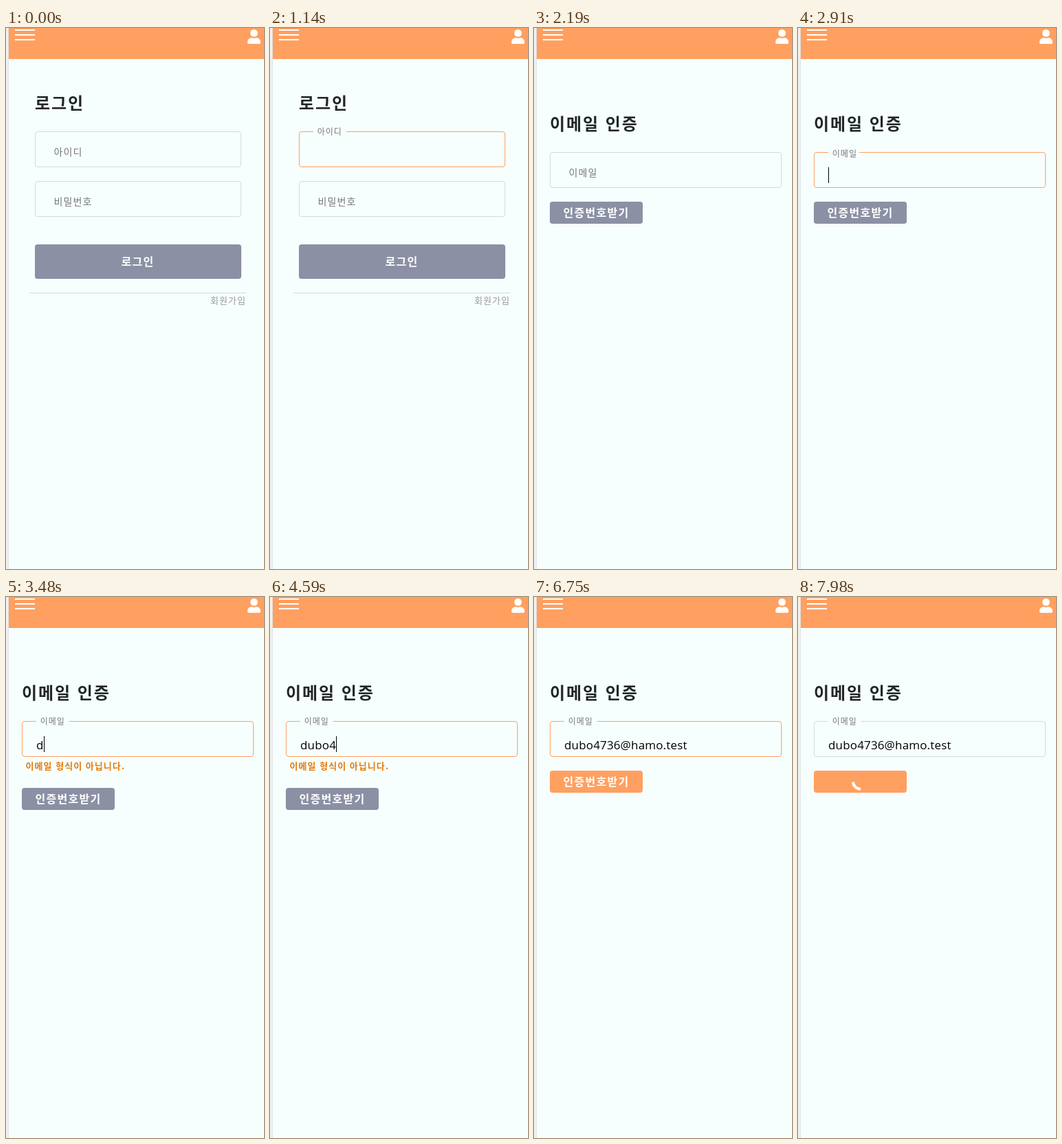
An HTML page that plays this animation: 375x785 px, repeating every 8000 ms.

```html
<!DOCTYPE html>
<html lang="ko">
<head>
<meta charset="utf-8">
<title>로그인</title>
<style>
  html, body { margin: 0; width: 100%; height: 100%; overflow: hidden; background: #f7fffe; }
  svg { display: block; width: 375px; height: 785px; }
  text { font-family: "Noto Sans CJK KR", "Noto Sans CJK", sans-serif; letter-spacing: .08em; white-space: pre; }
  .title { font-weight: 700; fill: #212529; }
  .label { font-weight: 500; fill: #777; }
  .error { font-weight: 700; fill: #e67a0c; }
  .latin { letter-spacing: .3px; }
  .button { font-weight: 700; fill: #fff; }
  .link { fill: #999; }
  .value { font: 17px "Open Sans", "Noto Sans", sans-serif; letter-spacing: .15px; fill: #000; }
</style>
</head>
<body>
<svg id="stage" viewBox="0 0 375 785">
  <rect width="375" height="785" fill="#f7fffe"/>
  <rect width="3" height="785" fill="#f0f0f1"/>
  <rect x="3" width="1" height="785" fill="#e0e3e3"/>
  <rect x="4" width="371" height="45" fill="#ffa060"/>
  <path d="M13 3H42M13 10H42M13 17H42" stroke="#fff" stroke-width="2"/>
  <g fill="#fff">
    <circle cx="360.5" cy="7.4" r="5.4"/>
    <path d="M351 21V20A5.7 5.7 0 0 1 356.7 14.2H357.4A7.5 7.5 0 0 0 363.6 14.2H364.3A5.7 5.7 0 0 1 370 20V21A2 2 0 0 1 368 23H353A2 2 0 0 1 351 21Z"/>
  </g>
</svg>
<script>
const ORANGE = '#ffa060', GREY = '#8c90a4', LINE = '#d3dad9', PAPER = '#f7fffe';
const LOOP = 8000, STEP = 30, ERROR_SHIFT = 25;
const EMAIL = 'dubo4736@hamo.test', TYPO = 'dubo3';

// Moments at which each character of the address appears; the fifth is first mistyped.
const KEYS = [3480, 3630, 3810, 3930, 4590, 4710, 4800, 4950, 5340,
              5460, 5550, 5700, 5790, 5880, 5970, 6090, 6180, 6270];

function add(parent, tag, attrs = {}, content = '') {
  const el = document.createElementNS('http://www.w3.org/2000/svg', tag);
  set(el, attrs);
  el.textContent = content;
  return parent.appendChild(el);
}
function set(el, attrs) {
  for (const name in attrs) el.setAttribute(name, attrs[name]);
}
function show(el, visible) { el.style.display = visible ? '' : 'none'; }
function shift(el, on) { set(el, { transform: `translate(0 ${on ? ERROR_SHIFT : 0})` }); }
function between(t, from, to) { return t >= from && t < to; }
function ease(t, start, duration) {
  const p = Math.min(1, Math.max(0, (t - start) / duration));
  return 1 - (1 - p) ** 2;
}
function mix(a, b, p) { return a + (b - a) * p; }

// Places text by its left edge and vertical middle.
function place(x, middle, size) {
  return { x, y: middle + size * .37, 'font-size': size };
}
function write(parent, cls, x, middle, size, content) {
  return add(parent, 'text', { class: cls, ...place(x, middle, size) }, content);
}
function button(parent, x, y, width, height, textX, content) {
  const g = add(parent, 'g');
  const box = add(g, 'rect', { x, y, width, height, rx: 4, fill: GREY });
  const text = write(g, 'button', textX, y + height / 2, 16, content);
  return { g, box, text };
}
function field(parent, x, y, width, name) {
  const g = add(parent, 'g');
  const border = add(g, 'rect', { x: x + .5, y: y + .5, width: width - 1, height: 51, rx: 3.5, fill: 'none', stroke: LINE });
  const notch = add(g, 'rect', { x: x + 21, y: y - 1, width: 0, height: 3, fill: PAPER });
  const label = write(g, 'label', x + 27.5, y + 29.5, 14, name);
  const value = add(g, 'text', { class: 'value', x: x + 21, y: y + 41 });
  const caret = add(g, 'rect', { y: y + 22, width: 1, height: 23 });
  show(caret, false);
  return {
    g,
    update(lift, focused, caretOn, typed = '') {
      set(border, { stroke: focused ? ORANGE : LINE });
      set(notch, { width: 48 * lift });
      set(label, place(x + mix(27.5, 26.7, lift), y + mix(29.5, 1, lift), mix(14, 12, lift)));
      if (value.textContent !== typed) value.textContent = typed;
      set(caret, { x: Math.round(x + 21 + (typed ? value.getComputedTextLength() : 0)) });
      show(caret, caretOn);
    }
  };
}

const stage = document.getElementById('stage');

const login = add(stage, 'g');
write(login, 'title', 42, 109, 24, '로그인');
const idField = field(login, 42, 150, 300, '아이디');
const idError = write(login, 'error', 47, 215, 13, '');
add(idError, 'tspan', { class: 'latin' }, 'userID');
add(idError, 'tspan', {}, '가 누락되었습니다.');
const loginRest = add(login, 'g');
field(loginRest, 42, 222, 300, '비밀번호');
button(loginRest, 42, 314, 300, 50, 167.5, '로그인');
add(loginRest, 'rect', { x: 34, y: 384, width: 315, height: 1, fill: LINE });
write(loginRest, 'link', 297, 395, 13, '회원가입');

const verify = add(stage, 'g');
write(verify, 'title', 23, 139, 24, '이메일 인증');
const emailField = field(verify, 23, 180, 337, '이메일');
const emailError = write(verify, 'error', 28.5, 245, 13, '이메일 형식이 아닙니다.');
const send = button(verify, 23, 252, 135, 32, 42.5, '인증번호받기');
const spinner = add(send.g, 'path', {
  d: 'M-7.4 -7.4A10.5 10.5 0 0 1 7.4 -7.4', fill: 'none', stroke: '#fff', 'stroke-width': 4
});

function typedAt(t) {
  if (between(t, 4200, 4470)) return TYPO;
  return EMAIL.slice(0, KEYS.filter(key => t >= key).length);
}

function drawLogin(t) {
  const missing = t >= 1290;
  const lift = missing ? 1 - ease(t, 1260, 150) : ease(t, 660, 120);
  idField.update(lift, between(t, 690, 1290), between(t, 690, 1140));
  show(idError, missing);
  shift(loginRest, missing);
}

function drawVerify(t) {
  const sending = t >= 7380, valid = t >= 6270;
  const caretOn = between(t, 2850, 3360) || between(t, 3480, 6750) || between(t, 7230, 7380);
  emailField.update(ease(t, 2820, 120), between(t, 2850, 7380), caretOn, typedAt(t));
  const invalid = between(t, 3480, 6270);
  show(emailError, invalid);
  shift(send.g, invalid);
  set(send.box, { fill: valid ? ORANGE : GREY });
  show(send.text, !sending);
  show(spinner, sending);
  set(spinner, { transform: `translate(90.5 268) rotate(${(t - 7360) * .36})` });
}

function frame() {
  const t = Math.floor(performance.now() % LOOP / STEP) * STEP;
  const onLogin = t < 2190;
  show(login, onLogin);
  show(verify, !onLogin);
  if (onLogin) drawLogin(t); else drawVerify(t);
  requestAnimationFrame(frame);
}
frame();
</script>
</body>
</html>
```
